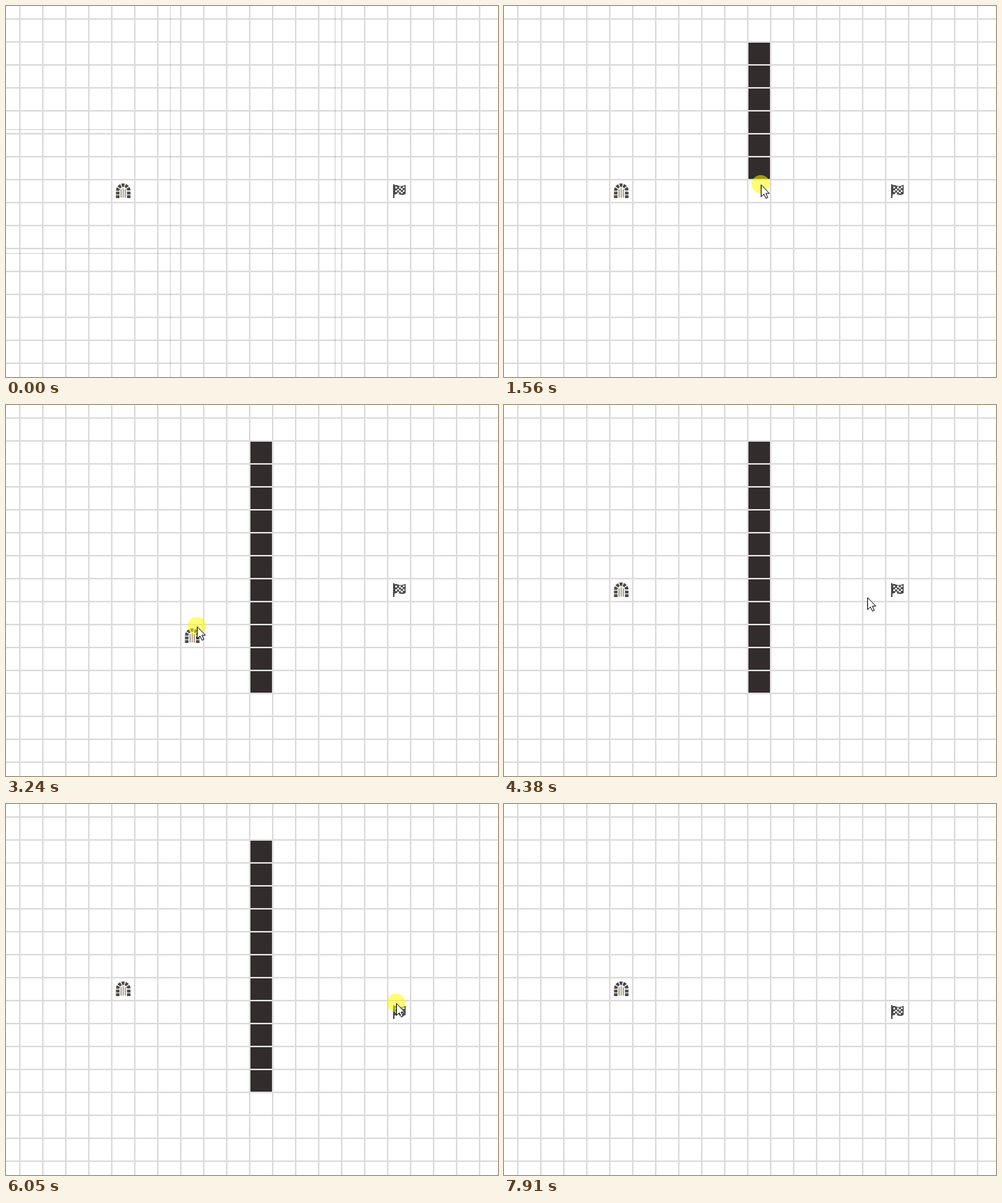
An HTML page with a canvas for the animation above (8.58 s loop, 642 by 485 pixels).

```html
<!DOCTYPE html>
<html lang="en">
<head>
<meta charset="utf-8">
<title>Grid editor</title>
<style>
  html, body { margin: 0; width: 100%; height: 100%; overflow: hidden; background: #fff; }
  canvas { display: block; }
</style>
</head>
<body>
<canvas id="stage" width="642" height="485"></canvas>
<script>
const W = 642, H = 485, LOOP = 8580, STEP = 67, FIRST = 210, CELL = 30, ROWS = 11;
const INK = '#484848';
const ctx = document.getElementById('stage').getContext('2d');

// Pointer path: time, x, y
const path = [
  [210, 560, 454], [480, 490, 310], [800, 365, 105], [1010, 334, 67], [1081, 334, 66],
  [1550, 335, 233], [1890, 347, 351], [1960, 347, 360], [2020, 343, 357], [2260, 225, 283],
  [2480, 147, 242], [2570, 143, 236], [2770, 150, 177], [2980, 225, 144], [3120, 279, 195],
  [3225, 249, 289], [3330, 195, 293], [3470, 150, 258], [3640, 147, 215], [3800, 145, 228],
  [3910, 150, 241], [4110, 150, 241], [4364, 474, 251], [4500, 505, 246], [4620, 512, 238],
  [4770, 540, 205], [4910, 512, 175], [5060, 428, 200], [5180, 450, 240], [5302, 506, 205],
  [5460, 516, 225], [5640, 510, 256], [5780, 509, 260], [6050, 509, 260], [6300, 405, 130],
  [6480, 336, 62], [6530, 335, 64], [6843, 342, 176], [7330, 337, 352], [7390, 335, 368],
  [7590, 335, 368], [7720, 375, 410], [7910, 482, 505]
];
const presses = [[1081, 2000], [2520, 4110], [4560, 6050], [6510, 7590]];

// Monotone cubic interpolation, so pauses and turns never overshoot
function slope(i, axis) {
  const secant = k => (path[k + 1][axis] - path[k][axis]) / (path[k + 1][0] - path[k][0]);
  if (i === 0) return secant(0);
  if (i === path.length - 1) return secant(i - 1);
  const a = secant(i - 1), b = secant(i);
  return a * b > 0 ? 2 * a * b / (a + b) : 0;
}

function pointer(t) {
  t = Math.max(path[0][0], Math.min(path.at(-1)[0], t));
  const i = Math.max(0, path.findIndex(p => p[0] >= t) - 1);
  const a = path[i], b = path[i + 1], span = b[0] - a[0], u = (t - a[0]) / span;
  return [1, 2].map(axis =>
    a[axis] * (1 + 2 * u) * (1 - u) ** 2 + b[axis] * u * u * (3 - 2 * u) +
    span * (slope(i, axis) * u * (1 - u) ** 2 - slope(i + 1, axis) * u * u * (1 - u)));
}

const column = x => Math.floor((x - 18) / CELL);
const row = y => Math.floor((y - 17) / CELL);
const cellCentre = ([x, y]) => [column(x) * CELL + 33, row(y) * CELL + 32];
const dragged = (t, start, end, home) =>
  t < start ? home : cellCentre(pointer(Math.min(t, end)));

function box(color, x, y, w, h) {
  ctx.fillStyle = color;
  ctx.fillRect(x, y, w, h);
}

function at([x, y], draw) {
  ctx.save();
  ctx.translate(x, y);
  draw();
  ctx.restore();
}

function drawGrid() {
  box('#fff', 0, 0, W, H);
  for (let x = 17; x < W; x += CELL) box('#dcdcdc', x, 0, 2, H);
  for (let y = 16; y < H; y += CELL) box('#dcdcdc', 0, y, W, 2);
}

function drawGuides() {
  for (const x of [214, 429]) box('rgba(0,0,0,.16)', x, 0, 1, H);
  for (const y of [161, 323]) box('rgba(0,0,0,.16)', 0, y, W, 1);
}

function drawWall(t) {
  const reached = Math.max(0, Math.min(ROWS, row(pointer(t - STEP)[1])));
  let from = 1, to = ROWS;
  if (t < 1081 || t >= 7390) return;
  if (t < 1960) to = reached;
  if (t >= 6530) from = reached + 1;
  for (let r = from; r <= to; r++) box('#322c2d', 319, 18 + r * CELL, 28, 28);
}

function drawGate() {
  ctx.strokeStyle = INK;
  ctx.lineWidth = 4.6;
  ctx.setLineDash([3.5, 1.12]);
  ctx.beginPath();
  ctx.arc(0, -.5, 7.2, Math.PI, 2 * Math.PI);
  ctx.stroke();
  for (const x of [-9.5, 4.9]) {
    for (const y of [.7, 5.4]) box(INK, x, y, 4.6, 3.7);
  }
  box('#8b7a68', -3.4, -2.5, 1.2, 11);
  box('#b07b43', -.6, -4, 1.2, 12.5);
  box('#8b7a68', 2.2, -2.5, 1.2, 11);
}

function drawFlag() {
  box('#625a45', -8, -9, 2, 18);
  ctx.fillStyle = INK;
  ctx.fill(new Path2D('M-7-7.5C-3-9.5 0-5.8 3-6.5Q6-7 8.5-8.3V3.7C5 5.5 3 5.2 0 4.2Q-3 3.2-7 5Z'));
  for (let r = 0; r < 4; r++) {
    for (let c = 0; c < 5; c++) {
      if ((r + c) % 2 === 0) {
        box('#fff', -5 + c * 2.45, -5.8 + r * 2.4 + Math.sin(c * 1.4) * .5, 2.3, 2.2);
      }
    }
  }
}

function drawPointer(pressed) {
  if (pressed) {
    ctx.fillStyle = 'rgba(255,250,0,.54)';
    ctx.beginPath();
    ctx.arc(0, 0, 12, 0, 2 * Math.PI);
    ctx.fill();
  }
  const arrow = new Path2D('M.5.8V16.5L4.2 13L6.8 18.5L9.2 17.4L6.7 12H11.3Z');
  ctx.fillStyle = '#fff';
  ctx.fill(arrow);
  ctx.strokeStyle = '#111';
  ctx.lineWidth = 1;
  ctx.stroke(arrow);
}

function draw(time) {
  const t = time % LOOP;
  const tick = FIRST + STEP * Math.floor((t - FIRST) / STEP);
  drawGrid();
  if (t < 70) drawGuides();
  drawWall(tick);
  at(dragged(tick, 2520, 4110, [153, 242]), drawGate);
  at(dragged(tick, 4560, 6050, [513, 242]), drawFlag);
  if (t >= FIRST && t < 7910) {
    const pressed = presses.some(([a, b]) => tick >= a && tick < b);
    at(pointer(tick), () => drawPointer(pressed));
  }
}

function frame() {
  draw(performance.now());
  requestAnimationFrame(frame);
}
frame();
</script>
</body>
</html>
```
